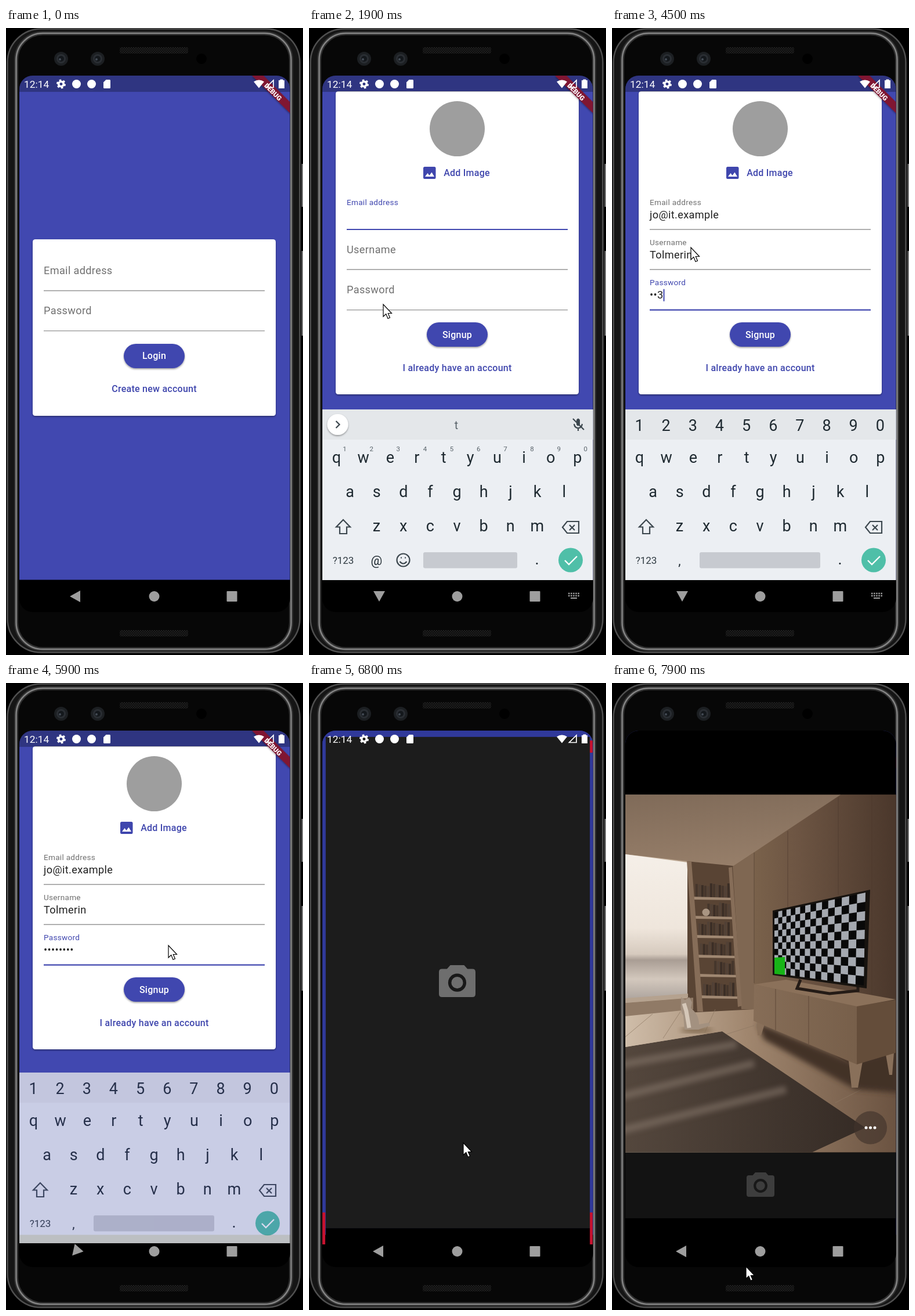
Recreate the animation shown at these times as an HTML page. Size 512 by 1080 pixels, loop 8 s.

```html
<!DOCTYPE html>
<html lang="en">
<head>
<meta charset="utf-8">
<title>Signup flow</title>
<style>
html, body { margin: 0; width: 100%; height: 100%; overflow: hidden; background: #000; }
svg { display: block; width: 512px; height: 1080px; font-family: Roboto, sans-serif; }
.btn { font-size: 16px; font-weight: 500; letter-spacing: .25px; text-anchor: middle; }
.field { font-size: 18.13px; letter-spacing: .02em; white-space: pre; }
.key { font-size: 27px; fill: #1f2a31; text-anchor: middle; }
.hint { font-size: 11.5px; fill: #59636a; text-anchor: middle; }
.line { fill: none; stroke: #3c474e; stroke-width: 2.2; }
</style>
</head>
<body>
<svg viewBox="0 0 512 1080" xmlns="http://www.w3.org/2000/svg">
<defs>
  <clipPath id="screen"><rect x="23" y="82" width="466.5" height="924" rx="23"/></clipPath>
  <clipPath id="rugClip"><path d="M23 627L190 600L437 766L345 808.5H23z"/></clipPath>
  <filter id="soft"><feGaussianBlur stdDeviation="5"/></filter>
  <filter id="drop" x="-20%" y="-20%" width="140%" height="160%"><feDropShadow dx="0" dy="1.6" stdDeviation="1.5" flood-opacity=".4"/></filter>
  <linearGradient id="sky" x2="0" y2="1"><stop offset="0" stop-color="#f5efe8"/><stop offset=".5" stop-color="#efe6dc"/><stop offset=".68" stop-color="#d6cabe"/><stop offset=".72" stop-color="#a99d94"/><stop offset=".85" stop-color="#d3c8bd"/><stop offset="1" stop-color="#aaa19b"/></linearGradient>
  <linearGradient id="ceil" x1=".1" x2=".35" y2="1"><stop offset="0" stop-color="#806b59"/><stop offset="1" stop-color="#967e69"/></linearGradient>
  <linearGradient id="wall"><stop offset="0" stop-color="#80684f"/><stop offset=".4" stop-color="#6d5543"/><stop offset="1" stop-color="#4a372b"/></linearGradient>
  <linearGradient id="floor"><stop offset="0" stop-color="#cfbda9"/><stop offset=".45" stop-color="#a0866e"/><stop offset="1" stop-color="#6b5341"/></linearGradient>
  <linearGradient id="rug"><stop offset="0" stop-color="#54473d"/><stop offset="1" stop-color="#352b25"/></linearGradient>
  <linearGradient id="chest"><stop offset="0" stop-color="#866d57"/><stop offset="1" stop-color="#775f4a"/></linearGradient>
  <pattern id="mesh" width="4" height="4" patternUnits="userSpaceOnUse"><rect width="4" height="4" fill="#202020"/><path d="M0 0L4 4M4 0L0 4" stroke="#0b0b0b"/></pattern>
  <g id="lens"><circle r="12" fill="#1c1f22"/><circle r="8" fill="#2a2e33"/><circle r="5" fill="#14181c"/><circle cx="-2" cy="1" r="2" fill="#434b54"/></g>
  <g id="camera"><path fill="currentColor" d="M4 5H10.5L15 0H33L37.500 5H44Q48 5 48 9V38Q48 42 44 42H4Q0 42 0 38V9Q0 5 4 5z"/><circle cx="24" cy="23" r="9.800" fill="none" stroke="#181818" stroke-width="4.200"/></g>
</defs>

<!-- phone body -->
<rect width="512" height="1080"/>
<path d="M511 234V308M511 384V530" stroke="#777" stroke-width="3"/>
<g fill="none">
  <rect x="2.500" y="1.500" width="504" height="1074" rx="58" fill="#151515" stroke="#505050" stroke-width="2.500"/>
  <rect x="17.500" y="9" width="474" height="1061" rx="46" fill="#070707" stroke="#303030" stroke-width="7"/>
  <rect x="17.500" y="9" width="474" height="1061" rx="46" stroke="#858585" stroke-width="2.500"/>
</g>
<rect x="196" y="33" width="118" height="11" rx="3" fill="url(#mesh)"/>
<rect x="196" y="1037" width="118" height="11" rx="3" fill="url(#mesh)"/>
<use href="#lens" x="95" y="53"/><use href="#lens" x="158" y="53"/>
<circle cx="337" cy="53" r="9" fill="#000"/>

<g clip-path="url(#screen)">
  <rect x="23" y="82" width="467" height="924"/>

  <g id="app">
    <rect x="23" y="82" width="467" height="868.5" fill="#4148b0"/>
    <g id="login">
      <rect x="46" y="364" width="419" height="304" rx="4.5" fill="#fff" filter="url(#drop)"/>
      <rect x="203" y="544" width="105" height="42" rx="21" fill="#4047af" filter="url(#drop)"/>
      <text class="btn" x="255.5" y="570" fill="#fff">Login</text>
      <text class="btn" x="255.5" y="626.5" fill="#3f46ad">Create new account</text>
    </g>
    <g id="signup">
      <rect x="46" y="109" width="419" height="522" rx="4.5" fill="#fff" filter="url(#drop)"/>
      <circle cx="255.5" cy="173.5" r="47.5" fill="#9e9e9e"/>
      <rect x="197" y="239" width="21.5" height="21" rx="2.5" fill="#3f46ad"/>
      <path d="M200 256L204.500 250L207.500 254L211.500 248.500L216 256z" fill="#fff"/>
      <text class="btn" x="272" y="255" fill="#3f46ad">Add Image</text>
      <rect x="203" y="507" width="105" height="42" rx="21" fill="#4047af" filter="url(#drop)"/>
      <text class="btn" x="255.500" y="534" fill="#fff">Signup</text>
      <text class="btn" x="255.500" y="590.500" fill="#3f46ad">I already have an account</text>
    </g>
    <rect x="23" y="82" width="467" height="28" fill="#000" opacity=".27"/>
    <path d="M424 82H444L490 128V147z" fill="#801733" filter="url(#drop)"/>
    <text transform="translate(457.500 113) rotate(45)" font-size="11.500" font-weight="900" fill="#fff" text-anchor="middle">DEBUG</text>
  </g>

  <g id="launch">
    <rect x="23" y="82" width="467" height="868" fill="#30399a"/>
    <path d="M25.500 912V967M486.500 912V967M486.500 99V120" stroke="#c4122f" stroke-width="5"/>
    <g id="opening">
      <rect x="23" y="82" width="467" height="868.500" fill="#1c1c1c"/>
      <rect x="23" y="950" width="467" height="60"/>
    </g>
    <use href="#camera" color="#6e6e6e" transform="translate(224 486) scale(1.312)"/>
  </g>

  <g id="status" fill="#fff">
    <text x="31" y="102.500" font-size="17.4">12:14</text>
    <circle cx="95" cy="96.500" r="4.300" fill="none" stroke="#fff" stroke-width="3.600"/>
    <circle cx="95" cy="96.500" r="6.800" fill="none" stroke="#fff" stroke-width="2.400" stroke-dasharray="3.560"/>
    <circle cx="121.500" cy="96.500" r="7.500"/><circle cx="147.500" cy="96.500" r="7.500"/>
    <path d="M172.500 89H178.500Q180 89 180 90.500V102.500Q180 104 178.500 104H169.500Q168 104 168 102.500V93.500z"/>
    <path d="M427 92.500Q436 86.500 445 92.500L436 103.500z"/>
    <path d="M448.500 102.500H461V90z" fill="none" stroke="#fff" stroke-width="1.700"/>
    <path d="M472.500 90V88.500H477.500V90H480V104H470V90z"/>
  </g>

  <g id="viewer">
    <rect x="23" y="82" width="467" height="924"/>
    <g id="room">
      <rect x="23" y="192.500" width="467" height="616" fill="url(#floor)"/>
      <path d="M392 192.500H490V702L245 562L206 316z" fill="url(#wall)"/>
      <path d="M23 192.500H394L208 316L130 307L23 295z" fill="url(#ceil)"/>
      <path d="M130 307L209 315L245 562L130 568z" fill="#594434"/>
      <path d="M208 316L245 292V562H223z" fill="#7f6752"/>
      <path d="M245 292V517M303 255V386M390 197V365M448 193V545" stroke="#4b392d" opacity=".6"/>
      <path d="M23 295L130 309V540L23 548z" fill="url(#sky)"/>
      <path d="M23 543L131 535V542L23 551z" fill="#b5a28f"/>
      <path d="M23 551L140 542V562L23 574z" fill="#907a66"/>
      <path d="M70 570L20 612M118 566L88 612M178 562L160 602M245 590L197 605M430 700L385 723" stroke="#8d7863" opacity=".7"/>
      <path d="M250 585L410 652L495 632V706L420 700L262 614z" fill="#433226" filter="url(#soft)"/>
      <g clip-path="url(#rugClip)">
        <path d="M23 627L190 600L437 766L345 808.5H23z" fill="url(#rug)"/>
        <path d="M0 660L215 622M0 716L245 655M10 772L300 700" stroke="#85766a" stroke-width="13" opacity=".6" filter="url(#soft)"/>
      </g>
    </g>
    <circle cx="445.500" cy="766" r="28.500" fill="#41342b" opacity=".65"/>
    <g fill="#fff"><circle cx="438" cy="766" r="2.500"/><circle cx="445.500" cy="766" r="2.500"/><circle cx="453" cy="766" r="2.500"/></g>
    <rect x="23" y="809" width="467" height="113" fill="#131313"/>
    <use id="shutter" href="#camera" x="232" y="843"/>
  </g>

  <g id="keyboard">
    <rect x="23" y="657" width="467" height="294" fill="#eceff3"/>
    <rect x="23" y="657" width="467" height="52" fill="#e4e7ea"/>
    <path class="line" d="M59 847L47 859.500H53V871H65V859.500H71z"/>
    <path class="line" d="M445 850H465V870H445L437 860zM449 856L458 865M458 856L449 865"/>
    <text x="59" y="923" font-size="17" text-anchor="middle" fill="#303b42">?123</text>
    <text class="key" x="393" y="924" font-size="22">.</text>
    <circle cx="451" cy="916.500" r="21" fill="#4fbfa8"/>
    <path d="M441 917L448 924L462 910" fill="none" stroke="#fff" stroke-width="2.400"/>
    <rect id="space" y="903" height="27.500" rx="3" fill="#c7cad0"/>
    <text id="side" x="116.500" y="925" font-size="22" text-anchor="middle" fill="#1f2a31"></text>
    <g id="digits"></g>
    <g id="words">
      <circle cx="49.500" cy="683" r="18" fill="#fff" filter="url(#drop)"/>
      <path class="line" d="M46.500 677L52.500 683L46.500 689"/>
      <text id="hint" x="254" y="691" font-size="19.500" fill="#59636a" text-anchor="middle"></text>
      <path d="M461 675Q464 670 467 675V683Q464 688 461 683z" fill="#3c474e"/>
      <path class="line" d="M457 682Q458 689 464 689Q470 689 471 682M464 689V694M455 673L474 692"/>
      <g class="line"><circle cx="162.500" cy="916.500" r="11"/><path d="M156.500 919Q162.500 926 168.500 919M158 912.500H160M165 912.500H167"/></g>
    </g>
  </g>

  <g id="nav" fill="#9e9e9e">
    <path id="back" d="M-10 1L8 -9V11z"/>
    <circle cx="255.500" cy="979" r="9"/>
    <rect x="380.500" y="970" width="18" height="18" rx="1"/>
    <g id="keysIcon"><path d="M447 974H466M447 978H466" stroke="#9e9e9e" stroke-width="2.500" stroke-dasharray="2.500 1.600"/><path d="M451 982H462" stroke="#9e9e9e" stroke-width="2.200"/></g>
  </g>
</g>
<path id="pointer" d="M0 0V21L4.800 16.500L8 24.500L11.500 23L8.300 15.500H14.500z" fill="#fff" stroke="#000" stroke-width="1.200"/>
</svg>
<script>
const $ = id => document.getElementById(id);
const lerp = (a, b, p) => a + (b - a) * p;
const clamp = v => Math.max(0, Math.min(1, v));
const show = (id, on) => $(id).setAttribute('display', on ? 'inline' : 'none');

function add(parent, tag, attrs, text = '') {
  const el = document.createElementNS('http://www.w3.org/2000/svg', tag);
  for (const k in attrs) el.setAttribute(k, attrs[k]);
  el.textContent = text;
  return parent.appendChild(el);
}

function field(parent, name, y) {
  const line = add(parent, 'path', { d: `M65 ${y}H446` });
  const label = add(parent, 'text', { class: 'field', x: 65 }, name);
  const value = add(parent, 'text', { class: 'field', x: 65, y: y - 19.5, fill: '#202020' });
  const caret = add(parent, 'rect', { y: y - 36, width: 2, height: 21, fill: '#4047af' });
  return (lift = 0, focus = false, text = '', blink = false) => {
    line.setAttribute('stroke', focus ? '#4047af' : '#949494');
    line.setAttribute('stroke-width', focus ? 2.2 : 1.3);
    label.style.fontSize = lerp(18.13, 13.6, lift) + 'px';
    label.setAttribute('y', y - lerp(28.5, 42.5, lift));
    label.setAttribute('fill', focus ? '#4047af' : '#707070');
    value.textContent = text;
    caret.setAttribute('display', focus && blink ? 'inline' : 'none');
    if (focus) caret.setAttribute('x', 65 + (text ? value.getComputedTextLength() : 0));
  };
}

field($('login'), 'Email address', 452.5)();
field($('login'), 'Password', 521.7)();

// start: focus time, end: blur time, type: first key, gap: ms per key
const form = [
  { name: 'Email address', y: 347, text: 'jo@it.example', start: 1400, end: 2900, type: 2000, gap: 60 },
  { name: 'Username', y: 416, text: 'Tolmerin', start: 2900, end: 4000, type: 3000, gap: 90 },
  { name: 'Password', y: 485.7, text: '12345678', start: 4000, end: 6600, type: 4000, gap: 150, secret: true }
];
form.forEach(f => f.draw = field($('signup'), f.name, f.y));

function drawField(f, t) {
  const n = Math.max(0, Math.min(f.text.length, Math.floor((t - f.type) / f.gap)));
  let text = f.text.slice(0, n);
  if (f.secret && n) text = '•'.repeat(n - 1) + (t < 5600 ? text[n - 1] : '•');
  const edited = n ? f.type + n * f.gap : f.start;
  const blink = (t - edited) % 1000 < 500;
  f.draw(clamp((t - f.start + 50) / 150), t >= f.start && t < f.end, text, blink);
  return text;
}

function keyRow(chars, x, y, parent = $('keyboard')) {
  [...chars].forEach((c, i) => add(parent, 'text', { class: 'key', x: x + i * 46.15, y }, c));
}
keyRow('qwertyuiop', 47.5, 749);
keyRow('asdfghjkl', 70.5, 807.5);
keyRow('zxcvbnm', 116.5, 866.5);
keyRow('1234567890', 47, 693.5, $('digits'));
[...'1234567890'].forEach((c, i) =>
  add($('words'), 'text', { class: 'hint', x: 61.5 + i * 46.15, y: 729 }, c));

function buildRoom() {
  const room = $('room');
  const poly = (d, fill) => add(room, 'path', { d, fill });
  // ladder shelf with books
  [370, 403, 436, 470, 503, 540].forEach((y, i) => {
    const left = 133 + (y - 308) * .078, right = 204 + (y - 308) * .065;
    const first = i === 4 ? 28 : i === 1 ? 24 : 6;
    for (let x = left + first; x < right - 9; x += 5) {
      const h = 19 + (x * 7 + i * 5) % 6;
      add(room, 'rect', { x, y: y - h, width: 4, height: h, fill: ['#3b2e26', '#514136', '#45362c'][Math.floor(x) % 3] });
    }
    poly(`M${left} ${y - 2}L${right} ${y}V${y + 4}L${left} ${y + 3}z`, '#a08872');
  });
  add(room, 'circle', { cx: 162, cy: 395, r: 6.5, fill: '#a99582' });
  poly('M129 307L137 308L157 566H147zM201 318L207 317L224 556L217 558z', '#866d58');
  // cat
  add(room, 'ellipse', { cx: 146, cy: 598, rx: 28, ry: 5, fill: '#80694f', filter: 'url(#soft)' });
  poly('M119 541L126 546L133 541L138 550L136 560Q150 571 150 588L167 585L169 590L149 597H125L123 573Q117 565 119 552z', '#a39180');
  add(room, 'path', { d: 'M124 552L128 565L133 594', fill: 'none', stroke: '#d5c7b8', 'stroke-width': 7 });
  // cabinet
  poly('M250 582L263 588L257 607H251zM408 651L432 652L424 697H413zM472 640L486 637L483 675H478z', '#89705a');
  poly('M245 519L422 556V657L244 582z', 'url(#chest)');
  poly('M422 556L489 546V637L422 657z', '#644d3a');
  poly('M245 519L300 511L489 545L422 557z', '#8b715a');
  add(room, 'path', { d: 'M282 527V598M339 539V622', stroke: '#5f4938' });
  // television
  add(room, 'path', { d: 'M325 511L319 526L375 535L424 530V523', fill: 'none', stroke: '#241b16', 'stroke-width': 5 });
  poly('M277 392L445 356L439 526L277 503z', '#17130f');
  poly('M280 395L437 361L434 521L280 500z', '#090909');
  const cols = 16, rows = 10;
  const spot = (c, r) => {
    const u = c / cols, p = u / (1.52 - .52 * u), v = r / rows;
    return lerp(280, lerp(437, 434, v), p).toFixed(1) + ' ' +
      lerp(lerp(395, 500, v), lerp(361, 521, v), p).toFixed(1);
  };
  let d = '';
  for (let c = 0; c < cols; c++) for (let r = 0; r < rows; r++)
    if ((c + r) % 2) d += `M${spot(c, r)}L${spot(c + 1, r)}L${spot(c + 1, r + 1)}L${spot(c, r + 1)}z`;
  poly(d, '#a5a9b0');
  poly('M280 473L298 472V503L280 501z', '#17b317');
}
buildRoom();

// time, x, y
const path = [
  [300, 300, 1010], [700, 262, 615], [900, 262, 615], [1300, 128, 476], [2700, 128, 476],
  [2900, 136, 378], [4800, 136, 378], [5600, 440, 820], [5800, 446, 905], [5900, 280, 452],
  [6200, 262, 388], [6500, 262, 388], [6800, 266, 792], [7100, 245, 879], [7400, 245, 879], [7900, 231, 1005]
];

function movePointer(t) {
  show('pointer', t >= 400);
  const i = Math.max(1, path.findIndex(p => p[0] >= t));
  const [t0, x0, y0] = path[i - 1], [t1, x1, y1] = path[i];
  const p = clamp((t - t0) / (t1 - t0)), e = p * p * (3 - 2 * p);
  $('pointer').setAttribute('transform', `translate(${lerp(x0, x1, e)} ${lerp(y0, y1, e)})`);
}

function drawKeyboard(t, texts) {
  const n = Math.max(0, t < 2500 ? (1600 - t) / 100 : (t - 5800) / 100);
  const numeric = t >= 4000;
  show('keyboard', n < 2.2);
  $('keyboard').setAttribute('transform', `translate(0 ${14 * n * n})`);
  $('keyboard').setAttribute('opacity', clamp(1 - .2 * n * n));
  show('digits', numeric);
  show('words', !numeric);
  $('space').setAttribute('x', numeric ? 151 : 197);
  $('space').setAttribute('width', numeric ? 208 : 162);
  $('side').textContent = t < 2900 ? '@' : ',';
  $('hint').textContent = t < 2900 ? texts[0] || 't' : texts[1];
  show('keysIcon', n === 0);
  $('back').setAttribute('transform', `translate(120 978) rotate(${-90 * clamp(1 - n * .46)})`);
}

function drawCamera(t) {
  show('launch', t >= 6700 && t < 7100);
  show('viewer', t >= 7100);
  const s = t < 6800 ? .9 : t < 6900 ? .975 : 1;
  $('opening').setAttribute('transform', `translate(255.500 516) scale(${s}) translate(-255.500 -516)`);
  $('shutter').setAttribute('color', t < 7500 ? '#fff' : '#3d3d3d');
}

function draw(t) {
  show('login', t < 900);
  show('signup', t >= 900);
  $('signup').setAttribute('transform', `translate(0 ${t >= 1500 && t < 6000 ? 0 : 146})`);
  drawKeyboard(t, form.map(f => drawField(f, t)));
  drawCamera(t);
  movePointer(t);
}

function tick() {
  draw(Math.floor(performance.now() % 8000 / 100) * 100);
  requestAnimationFrame(tick);
}
tick();
</script>
</body>
</html>
```
